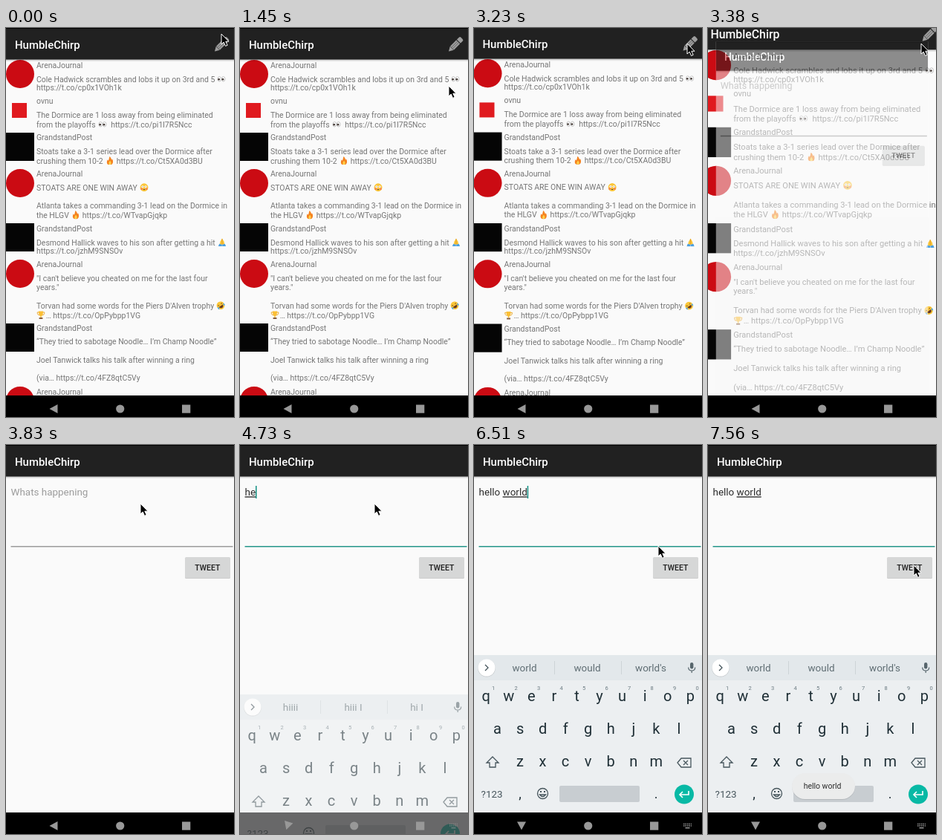
Write an HTML page that moves like this. It is 307 px wide and 524 px high and loops after 8000 ms.

```html
<!DOCTYPE html>
<html lang="en">
<head>
<meta charset="utf-8">
<title>HumbleChirp</title>
<style>
html, body { margin: 0; width: 100%; height: 100%; overflow: hidden; background: #000; }
body { font-family: Roboto, sans-serif; }
#stage { position: relative; width: 307px; height: 524px; overflow: hidden; }
#feed { position: absolute; inset: 0; background: #fafafa; transform-origin: 153.5px 262px; }
#rows { position: absolute; top: 43px; left: 0; width: 307px; }
.row { position: relative; padding: 1.6px 0 4.54px 41px; font-size: 10.46px; line-height: 12.26px; color: #757575; white-space: pre; }
.row p { margin: 0; height: 12.26px; }
.row .name { margin-bottom: 6px; }
.icon { position: absolute; left: 0; top: 0; width: 37.5px; height: 38px; }
.disc { background: #cb0b13; border-radius: 50%; }
.dark { background: #050505; }
.red { background: #e01a1f; left: 8px; top: 9px; width: 20px; height: 20px; }
.emoji { width: 12px; height: 11.5px; vertical-align: -2px; margin: 0 .4px; }
svg.layer { position: absolute; inset: 0; width: 307px; height: 524px; font-family: Roboto, sans-serif; }
.mid { text-anchor: middle; }
.glyph { fill: none; stroke: #46555c; stroke-width: 1.3; }
#typed { white-space: pre; }
#typed .live { text-decoration: underline; text-decoration-thickness: 1px; }
</style>
</head>
<body>
<svg width="0" height="0" style="position:absolute">
  <symbol id="eyes" viewBox="0 0 12 12">
    <g fill="#fff" stroke="#9a9a9a" stroke-width=".6"><ellipse cx="3.2" cy="6" rx="2.4" ry="3.4"/><ellipse cx="8.8" cy="6" rx="2.4" ry="3.4"/></g>
    <g fill="#443a36"><circle cx="2.5" cy="6.4" r="1.4"/><circle cx="8.1" cy="6.4" r="1.4"/></g>
  </symbol>
  <symbol id="fire" viewBox="0 0 12 12">
    <path fill="#f5821f" d="M5.5 0C8 2 7.500 4 8.500 4.800L9 3.500C11 6 11 12 6 12S1 7.500 2.600 4.500L3.600 6C5 4 4.600 2 5.500 0Z"/>
    <path fill="#fdd44b" d="M6 6C8 8 8.500 11.500 6 11.500S4 8.500 6 6Z"/>
  </symbol>
  <symbol id="flushed" viewBox="0 0 12 12">
    <circle cx="6" cy="6" r="5.700" fill="#fbc638"/><circle cx="2.600" cy="8" r="1.700" fill="#f58b4c"/><circle cx="9.400" cy="8" r="1.700" fill="#f58b4c"/>
    <g fill="#fff"><circle cx="3.800" cy="5" r="1.700"/><circle cx="8.200" cy="5" r="1.700"/></g>
    <path stroke="#4b3a28" d="M3.500 5H4.200M7.800 5H8.500M4.800 9H7.200"/>
  </symbol>
  <symbol id="pray" viewBox="0 0 12 12">
    <path fill="#fbc638" d="M6 .500L8.700 5L9.500 9H2.500L3.300 5Z"/><path stroke="#d18c22" stroke-width=".7" d="M6 1V9"/>
    <path fill="#4a9fe0" d="M2 8L5.800 9V12H.500ZM10 8L6.200 9V12H11.500Z"/>
  </symbol>
  <symbol id="laugh" viewBox="0 0 12 12">
    <g transform="rotate(-35 6 6)"><circle cx="6" cy="6" r="5.600" fill="#fbc638"/><path fill="#64371f" d="M2.800 6.500H9.200C8.800 11 3.200 11 2.800 6.500Z"/>
    <path stroke="#64371f" fill="none" stroke-width=".8" d="M2.500 4L4.500 4.800M9.500 4L7.500 4.800"/><path fill="#4ba8e8" d="M.500 6H2.200V9H.500ZM9.800 6H11.500V9H9.800Z"/></g>
  </symbol>
  <symbol id="cup" viewBox="0 0 12 12">
    <path fill="none" stroke="#e8a52a" d="M3 2H1C1 5 2 6 4 6M9 2H11C11 5 10 6 8 6"/>
    <path fill="#fbbf35" d="M2.800 .500H9.200C9.200 5 8 7 6.700 7.500V9.500H5.300V7.500C4 7 2.800 5 2.800 .500Z"/><path fill="#865c3f" d="M3.500 9.500H8.500V12H3.500Z"/>
  </symbol>
  <symbol id="bar" viewBox="0 0 307 46">
    <path fill="#000" opacity=".08" d="M0 42H307V45H0Z"/><path fill="#000" opacity=".12" d="M0 42H307V43.500H0Z"/>
    <path fill="#212121" d="M0 0H307V42.500H0Z"/><path fill="#000" d="M0 0H307V1H0Z"/>
    <text x="12" y="27.700" font-size="14.940" font-weight="500" fill="#fff">HumbleChirp</text>
  </symbol>
</svg>

<div id="stage">
  <div id="feed">
    <div id="rows"></div>
    <svg class="layer">
      <use href="#bar" width="307" height="46"/>
      <g transform="translate(281 31.500) rotate(-45)" fill="#9d9d9d">
        <path d="M0 0L6 -3.500V3.500Z"/><path d="M6.500 -3.500H18V3.500H6.500Z"/><path d="M19 -3.500H23Q25 -3.500 25 -1.500V1.500Q25 3.500 23 3.500H19Z"/>
        <path stroke="#5c5c5c" stroke-width=".8" d="M7 -1.200H18M7 1.200H18"/>
      </g>
    </svg>
  </div>

  <svg class="layer">
    <g id="compose">
      <path fill="#fafafa" d="M0 0H307V524H0Z"/>
      <use href="#bar" width="307" height="46"/>
      <text id="hint" x="6.500" y="68.300" font-size="13.450" fill="#9c9c9c">Whats happening</text>
      <text id="typed" x="6.500" y="68.300" font-size="13.450" fill="#2b2b2b"><tspan></tspan><tspan class="live"></tspan></text>
      <path id="caret" stroke="#0f8f82" stroke-width="1.500" d="M0 55V72"/>
      <path id="rule" stroke-width="1.500" d="M6.500 136.700H305.500"/>
      <rect x="241" y="152" width="61" height="28" rx="1.500" opacity=".18"/>
      <rect id="button" x="241" y="151" width="61" height="28" rx="1.500"/>
      <text class="mid" x="271.300" y="168.800" font-size="10.460" font-weight="500" fill="#1d1d1d">TWEET</text>
    </g>

    <g id="keyboard">
      <path fill="#eceff1" d="M0 283H307V524H0Z"/><path fill="#e3e8eb" d="M0 283H307V317H0Z"/>
      <path stroke="#cdd3d6" d="M108.500 291V309M198.500 291V309"/>
      <circle cx="17" cy="300.700" r="11.800" opacity=".12"/><circle cx="17" cy="300" r="11.500" fill="#fff"/>
      <path class="glyph" d="M15 296L19 300L15 304"/>
      <g fill="#56656c"><rect x="291" y="293" width="4.400" height="8.500" rx="2.200"/><path fill="none" stroke="#56656c" stroke-width="1.200" d="M288.700 299.500C288.700 305.500 297.700 305.500 297.700 299.500M293.200 304V307"/></g>
      <g id="words" class="mid" font-size="13.450"></g>
      <g id="keys" class="mid" fill="#1f2f36"></g>
      <path class="glyph" d="M25 420L33 428H29V434H21V428H17Z"/>
      <path class="glyph" d="M274 428L279 422H292V434H279ZM282 425L288 431M288 425L282 431"/>
      <circle class="glyph" cx="92.500" cy="469.500" r="7"/>
      <path class="glyph" d="M88.500 471Q92.500 476 96.500 471Z"/><path fill="#46555c" d="M89 466H91V468H89ZM94 466H96V468H94Z"/>
      <rect x="115" y="459" width="108" height="22" rx="2" fill="#c8cdd1"/>
      <circle cx="283" cy="470.500" r="13" fill="#08b9a5"/>
      <path fill="none" stroke="#fff" stroke-width="1.600" d="M289 466V471H277M281 467L277 471L281 475"/>
    </g>

    <path id="nav" d="M0 495H307V524H0Z"/>
    <g fill="#989898">
      <path id="back" d="M58.500 513L69.500 507V519Z"/><circle cx="153.700" cy="513" r="5.600"/><path d="M237 507.500H248.300V518.700H237Z"/>
      <g id="ime"><path fill="none" stroke="#989898" stroke-dasharray="1.500 1" stroke-width="1.500" d="M282 510.500H293M282 513H293"/><path d="M284.500 515H290.500V516.500H284.500Z"/></g>
    </g>

    <g id="toast">
      <rect x="113" y="443" width="85" height="35" rx="17.500" opacity=".1"/><rect x="113" y="442" width="85" height="35" rx="17.500" fill="#ebecec"/>
      <text class="mid" x="154" y="463" font-size="10.460" fill="#2a2a2a">hello world</text>
    </g>
    <path id="pointer" fill="#000" stroke="#fff" stroke-width="1" d="M0 0V14L3.200 11L5.600 16.400L8.200 15.200L5.800 10.200H10Z"/>
  </svg>
</div>

<script>
const $ = id => document.getElementById(id);
const LOOP = 8000;

// :name: marks an inline emoji
const posts = [
  ['disc', 'ArenaJournal', 'Cole Hadwick scrambles and lobs it up on 3rd and 5 :eyes:', 'https://t.co/cp0x1VOh1k'],
  ['red', 'ovnu', 'The Dormice are 1 loss away from being eliminated', 'from the playoffs :eyes:  https://t.co/pi1l7R5Ncc'],
  ['dark', 'GrandstandPost', 'Stoats take a 3-1 series lead over the Dormice after', 'crushing them 10-2 :fire: https://t.co/Ct5XA0d3BU'],
  ['disc', 'ArenaJournal', 'STOATS ARE ONE WIN AWAY :flushed:', '', 'Atlanta takes a commanding 3-1 lead on the Dormice in', 'the HLGV :fire: https://t.co/WTvapGjqkp'],
  ['dark', 'GrandstandPost', 'Desmond Hallick waves to his son after getting a hit :pray:', 'https://t.co/jzhM9SNSOv'],
  ['disc', 'ArenaJournal', '"I can\'t believe you cheated on me for the last four', 'years."', '', 'Torvan had some words for the Piers D\'Alven trophy :laugh:', ':cup:… https://t.co/OpPybpp1VG'],
  ['dark', 'GrandstandPost', '“They tried to sabotage Noodle… I’m Champ Noodle”', '', 'Joel Tanwick talks his talk after winning a ring', '', '(via… https://t.co/4FZ8qtC5Vy'],
  ['disc', 'ArenaJournal', '', '']
];
const withEmoji = s => s.replace(/:([a-z]+):/g, '<svg class="emoji"><use href="#$1"/></svg>');
$('rows').innerHTML = posts.map(([icon, name, ...lines]) =>
  `<div class="row"><i class="icon ${icon}"></i><p class="name">${name}</p>${lines.map(l => `<p>${withEmoji(l)}</p>`).join('')}</div>`).join('');

const label = (x, y, s, size, extra = '') => `<text x="${x}" y="${y}" font-size="${size}" ${extra}>${s}</text>`;
const keyRow = (letters, x, y) => [...letters].map((c, i) => label(x + i * 30.55, y, c, 20)).join('');
$('keys').innerHTML = keyRow('qwertyuiop', 16.3, 345) + keyRow('asdfghjkl', 31.5, 389) + keyRow('zxcvbnm', 62, 433)
  + [...'1234567890'].map((c, i) => label(26 + i * 30.5, 330, c, 7.5, 'fill="#6b7a81"')).join('')
  + label(24, 474.5, '?123', 13.4, 'fill="#46555c"') + label(62, 476, ',', 18) + label(245, 476, '.', 18);

const pointer = [
  [0, 290, 8], [140, 294, 3], [290, 296, 0], [430, 292, 8], [570, 287, 16], [850, 283, 60], [1000, 284, 105],
  [1450, 281, 78], [1600, 277, 52], [1740, 275, 34], [1880, 276, 35], [2330, 280, 29], [2480, 287, 21],
  [3530, 265, 35], [3680, 210, 64], [3830, 181, 79],
  [6210, 190, 86], [6360, 215, 106], [6510, 248, 136], [6660, 268, 154], [6810, 277, 162]
];
// time, feed scale, compose opacity, compose scale
const opening = [[0, 1, 0, .85], [3230, 1.004, 0, .85], [3380, 1.06, .5, .93], [3530, 1.13, 1, .985], [3680, 1.15, 1, 1]];
// time, offset, opacity, nav opacity, back rotation
const rising = [[0, 53, 0, 1, 0], [4730, 53, .58, .57, -72], [4870, 4, .95, .95, -90], [5020, 0, 1, 1, -90]];
// time, settled text, composing text, suggestions; * marks the bold one
const typing = [
  [0, '', '', ''], [4580, '', 'h', 'hiiii,hiii I,hi I'], [4730, '', 'he', 'hiiii,hiii I,hi I'],
  [4870, '', 'hel', 'hel,*hello,help'], [5020, '', 'hell', 'hell,hello,he\'ll'], [5160, '', 'hello', 'hello,hello I,hellos'],
  [5310, 'hello ', '', 'I,there,and'], [5460, 'hello ', 'w', 'w,*we,what'], [5610, 'hello ', 'wo', 'wo,*work,would'],
  [5760, 'hello ', 'wor', 'wor,*work,world'], [5910, 'hello ', 'worl', 'worl,*world,work'], [6060, 'hello ', 'world', 'world,would,world\'s']
];
const toast = [[0, 0], [7260, .4], [7410, .85], [7560, 1]];
const at = (track, t) => track.findLast(step => step[0] <= t).slice(1);
const zoom = s => `translate(153.500 262) scale(${s}) translate(-153.500 -262)`;
const [settled, live] = $('typed').children;

function draw(t) {
  const [feedScale, shown, composeScale] = at(opening, t);
  $('feed').style.transform = `scale(${feedScale})`;
  $('compose').setAttribute('opacity', shown);
  $('compose').setAttribute('transform', zoom(composeScale));

  const [done, composing, words] = at(typing, t);
  settled.textContent = done;
  live.textContent = composing;
  $('hint').setAttribute('opacity', done + composing ? 0 : 1);
  const width = done || composing ? $('typed').getComputedTextLength() : 0;
  $('caret').setAttribute('transform', `translate(${7.2 + width} 0)`);
  const blinkOff = t < 4430 || (t >= 6660 && t < 7110) || t >= 7560;
  $('caret').setAttribute('opacity', blinkOff ? 0 : 1);
  $('rule').setAttribute('stroke', t < 4430 ? '#9b9b9b' : '#24968a');
  $('button').setAttribute('fill', t >= 7110 && t < 7260 ? '#c3c4c4' : '#d6d7d7');

  const [offset, alpha, navAlpha, turn] = at(rising, t);
  $('keyboard').setAttribute('transform', `translate(0 ${offset})`);
  $('keyboard').setAttribute('opacity', alpha);
  $('nav').setAttribute('opacity', navAlpha);
  $('back').setAttribute('transform', `rotate(${turn} 64 513)`);
  $('ime').setAttribute('opacity', alpha);
  $('words').innerHTML = words.split(',').map((w, i) => label([68, 152.5, 238][i], 304.7, w.replace('*', ''), 13.45,
    w[0] === '*' ? 'font-weight="700" fill="#111"' : 'fill="#5f6d73"')).join('');

  $('toast').setAttribute('opacity', at(toast, t)[0]);
  $('pointer').setAttribute('transform', `translate(${at(pointer, t).join(' ')})`);
}

const start = performance.now();
function tick() {
  draw((performance.now() - start) % LOOP);
  requestAnimationFrame(tick);
}
tick();
</script>
</body>
</html>
```
